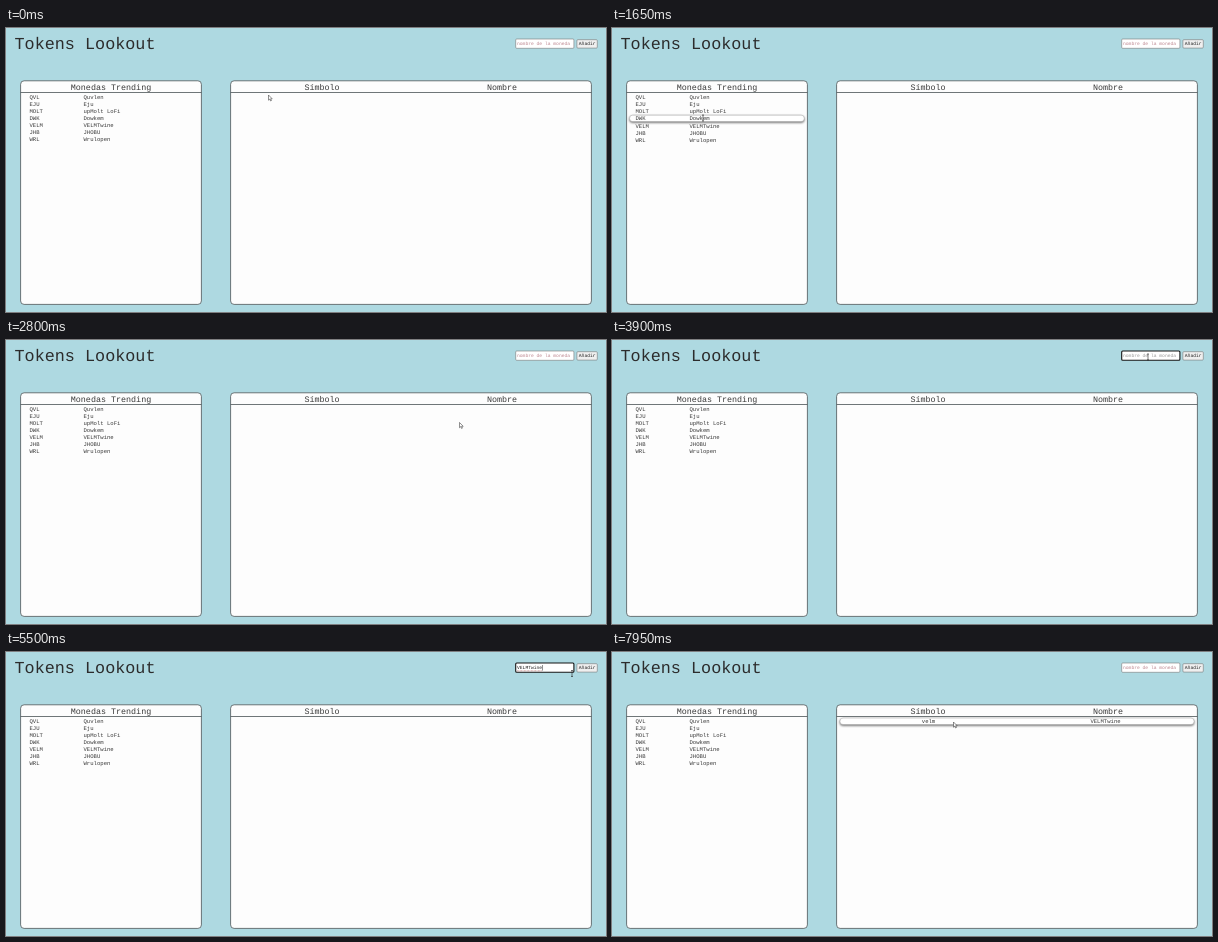
These frames come from a looping animation (600 px wide and 284 px high, 8000 ms). An HTML page:

```html
<!DOCTYPE html>
<html lang="es">
<head>
<meta charset="utf-8">
<title>Monedas</title>
<style>
  html, body { margin: 0; width: 100%; height: 100%; overflow: hidden; background: #aed9e1; }
  svg { display: block; width: 100%; height: 100%; }
  text { font: 5.6px "Liberation Mono", "Courier New", monospace; fill: #3a3a3a; text-rendering: geometricPrecision; white-space: pre; }
  .title { font-size: 16.8px; fill: #2c2c2c; }
  .head { font-size: 8.4px; text-anchor: middle; }
  .mid { text-anchor: middle; }
  .small { font-size: 4.67px; }
  .panel { fill: #fdfdfd; stroke: #4c5557; stroke-width: .8; }
  .pill { fill: #fff; stroke: #aaa; stroke-width: .5; filter: drop-shadow(.7px 1.2px 1px rgba(0, 0, 0, .6)); }
</style>
</head>
<body>
<svg viewBox="0 0 600 284" preserveAspectRatio="none">
  <text class="title" x="8.5" y="21">Tokens Lookout</text>

  <rect class="panel" x="14.6" y="52.8" width="180.8" height="223.6" rx="3.5"/>
  <path class="panel" d="M14.6 64.5H195.4"/>
  <text class="head" x="105" y="62.2">Monedas Trending</text>

  <rect class="panel" x="224.6" y="52.8" width="360.8" height="223.6" rx="3.5"/>
  <path class="panel" d="M224.6 64.5H585.4"/>
  <text class="head" x="316" y="62.2">Símbolo</text>
  <text class="head" x="496" y="62.2">Nombre</text>

  <rect id="pill" class="pill" height="6.4" rx="3"/>
  <g id="rows"></g>
  <g id="added">
    <text class="mid" x="316.5" y="70.8">velm</text>
    <text class="mid" x="493.5" y="70.8">VELMTwine</text>
  </g>

  <rect id="field" x="509.7" y="11" width="58.2" height="9.3" rx="1" fill="#fff"/>
  <text id="value" class="small" x="511" y="17.4"></text>
  <path id="spell" d="M511 18.8h25.2" stroke="#a55" stroke-width=".6" stroke-dasharray=".8 .6"/>
  <path id="caret" d="M511.3 13v5.6" stroke="#222" stroke-width=".5"/>
  <rect id="button" x="570.9" y="11.7" width="20.4" height="8.4" rx="1" stroke="#777" stroke-width=".6"/>
  <text class="small mid" x="581.2" y="17.4" style="fill:#222">Añadir</text>

  <path id="arrow" d="M0 0V5.2L1.2 4.1L2.1 6L2.9 5.6L2.1 3.8H3.7Z" fill="#fff" stroke="#222" stroke-width=".5"/>
  <path id="beam" d="M-1 -3H1M0 -3V3M-1 3H1" fill="none" stroke="#222" stroke-width=".6"/>
</svg>
<script>
const LOOP = 8000, ROW_TOP = 65.5, PITCH = 7.05;
const FOCUS = 3300, TYPE_START = 4250, KEY_GAP = 105, CLICK = 6000, ADDED = 6600;
const WORD = 'VELMTwine', HINT = 'nombre de la moneda';
const coins = [
  ['QVL', 'Quvlen'], ['EJU', 'Eju'], ['MOLT', 'upMolt LoFi'], ['DWK', 'Dowkem'],
  ['VELM', WORD], ['JHB', 'JHOBU'], ['WRL', 'Wrulopen']
];
// Pointer path: time, x, y
const path = [
  [0, 262.5, 67], [80, 262.5, 67], [500, 135, 72], [900, 96, 77], [1300, 88, 103],
  [1620, 91, 90], [1780, 91, 90], [2100, 104, 110], [2400, 160, 131], [2620, 205.5, 136],
  [2800, 453.5, 82.5], [2860, 454, 82], [3250, 536, 17], [4400, 536, 17], [4850, 549, 26],
  [5200, 553, 26], [5500, 566, 21.5], [5720, 573, 18], [6000, 576.3, 16.8],
  [7000, 576.3, 16.8], [7350, 470, 55], [7750, 345, 71], [7900, 341.5, 70], [LOOP, 341.5, 70]
];

const $ = id => document.getElementById(id);
const show = (id, on) => $(id).setAttribute('visibility', on ? 'visible' : 'hidden');
const set = (id, attrs) => { for (const k in attrs) $(id).setAttribute(k, attrs[k]); };

$('rows').innerHTML = coins.map(([symbol, name], i) => {
  const y = 70.8 + i * PITCH;
  return `<g><text x="23.5" y="${y}">${symbol}</text><text x="77.5" y="${y}">${name}</text></g>`;
}).join('');
const rows = [...$('rows').children];

function pointerAt(t) {
  const i = path.findIndex(p => p[0] > t);
  const [t0, x0, y0] = path[i - 1], [t1, x1, y1] = path[i];
  const k = (t - t0) / (t1 - t0), e = k * k * (3 - 2 * k);
  return [x0 + (x1 - x0) * e, y0 + (y1 - y0) * e];
}

function draw(now) {
  const t = now % LOOP;
  const [x, y] = pointerAt(t);
  const inside = (l, r, top, bottom) => x > l && x < r && y > top && y < bottom;
  const row = Math.floor((y - ROW_TOP) / PITCH);
  const coin = inside(17, 193, ROW_TOP, ROW_TOP + coins.length * PITCH) ? row : -1;
  const added = t >= ADDED;
  const addedHover = added && row === 0 && inside(227, 583, 0, 284);

  // A hovered row gains a border, nudging the rows below it
  rows.forEach((g, i) => {
    const shift = coin < 0 || i < coin ? 0 : i === coin ? .2 : .6;
    g.setAttribute('transform', `translate(0 ${shift})`);
  });
  show('pill', coin >= 0 || addedHover);
  set('pill', coin >= 0
    ? { x: 17.6, width: 174.6, y: 66 + coin * PITCH }
    : { x: 228, width: 354, y: 66.1 });
  show('added', added);

  const focused = t >= FOCUS && t < CLICK;
  const typed = added ? 0 : Math.max(0, Math.min(WORD.length, Math.ceil((t - TYPE_START) / KEY_GAP)));
  const typing = t > TYPE_START && t < TYPE_START + WORD.length * KEY_GAP;
  set('field', { stroke: focused ? '#151515' : '#777', 'stroke-width': focused ? 1.1 : .6 });
  $('value').textContent = typed ? WORD.slice(0, typed) : HINT;
  $('value').style.fill = typed ? '#222' : focused ? '#999' : '#bd8790';
  show('spell', typed === WORD.length);
  show('caret', focused && (typing || (t - FOCUS) % 1000 < 500));
  set('caret', { transform: `translate(${typed * 2.802} 0)` });
  set('button', { fill: inside(571, 591.3, 11.5, 20.3) ? '#dedede' : '#efefef' });

  const overText = coin >= 0 && [[23.5, 0], [77.5, 1]].some(
    ([left, col]) => x > left && x < left + coins[coin][col].length * 3.36);
  const beam = overText || inside(509, 568.5, 10, 22);
  show('beam', beam);
  show('arrow', !beam);
  set(beam ? 'beam' : 'arrow', { transform: `translate(${x} ${y})` });
  requestAnimationFrame(() => draw(performance.now()));
}
draw(performance.now());
</script>
</body>
</html>
```
